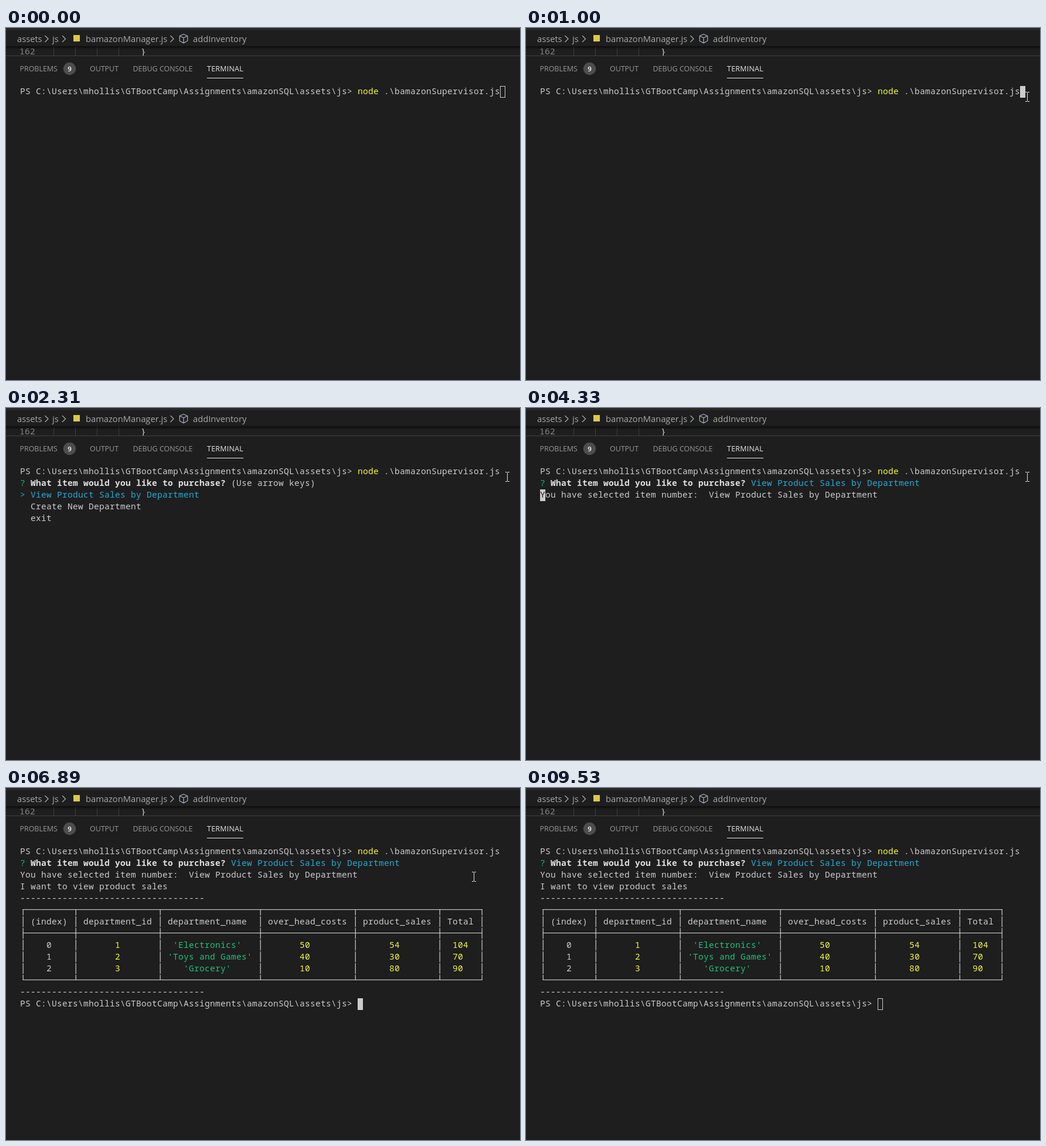
An HTML page that plays this animation: 877 px wide and 601 px high, repeating every 9620 ms.

```html
<!DOCTYPE html>
<html lang="en">
<head>
<meta charset="utf-8">
<title>Terminal session</title>
<style>
  html, body { margin: 0; width: 100%; height: 100%; overflow: hidden; background: #1e1e1e; }
  svg { display: block; }
  text { white-space: pre; }
  .mono { font: 14.5px "Noto Sans Mono", "DejaVu Sans Mono", monospace; letter-spacing: .3px; }
  .bold { font-weight: 700; }
  .crumb { font: 14.7px "Open Sans", "Noto Sans", sans-serif; fill: #a9a9a9; }
  .tab { font: 12.45px "Open Sans", "Noto Sans", sans-serif; fill: #979797; }
</style>
</head>
<body>
<svg id="stage" width="877" height="601" viewBox="0 0 877 601">
  <defs>
    <linearGradient id="shade" x2="0" y2="1">
      <stop offset="0" stop-color="#000" stop-opacity=".6"/>
      <stop offset="1" stop-color="#000" stop-opacity="0"/>
    </linearGradient>
  </defs>
  <rect width="877" height="601" fill="#1e1e1e"/>
  <rect width="877" height="4" fill="#272728"/>

  <path d="M81.5 31v16M118.5 31v16M155.5 31v16M192.5 31v16" stroke="#404040"/>
  <text class="mono" x="23" y="45" fill="#858585">162</text>
  <text class="mono" x="230" y="45" fill="#d4d4d4">}</text>
  <rect y="31" width="877" height="6" fill="url(#shade)"/>
  <rect y="47" width="877" height="1" fill="#414141"/>

  <text class="crumb" x="19" y="24">assets</text>
  <text class="crumb" x="79" y="24">js</text>
  <text class="crumb" x="136" y="24">bamazonManager.js</text>
  <text class="crumb" x="319" y="24">addInventory</text>
  <path d="M66.5 13l5.5 5.5-5.5 5.5M96 13l5.500 5.500-5.500 5.500M280.500 13l5.500 5.500-5.500 5.500"
        fill="none" stroke="#a9a9a9" stroke-width="1.3"/>
  <rect x="115" y="12" width="11" height="11" fill="#dcc84a"/>
  <path d="M303 10.500l6.700 3v8.500l-6.700 3.700-6.700-3.700v-8.500zM296.300 13.500l6.700 3.200 6.700-3.200M303 16.700v9"
        fill="none" stroke="#a8b4d0" stroke-width="1.2" stroke-linejoin="round"/>

  <text class="tab" x="23.500" y="74">PROBLEMS</text>
  <circle cx="108.500" cy="69.500" r="10.700" fill="#4d4d4d"/>
  <text class="tab" x="108.500" y="74" text-anchor="middle" style="fill:#fff;font-size:11.500px;font-weight:600">9</text>
  <text class="tab" x="143" y="74">OUTPUT</text>
  <text class="tab" x="216.500" y="74">DEBUG CONSOLE</text>
  <text class="tab" x="343" y="74" style="fill:#e7e7e7;letter-spacing:.25px">TERMINAL</text>
  <rect x="343" y="85" width="62" height="1" fill="#e7e7e7"/>
</svg>
<script>
const LOOP = 9620, CELL = 9, ROW = 20, LEFT = 24, TOP = 99;
const FG = '#cccccc', YELLOW = '#f5f543', GREEN = '#1fc27c', CYAN = '#23acd3', BG = '#1e1e1e';
const stage = document.getElementById('stage');

function add(parent, tag, attrs, text) {
  const el = document.createElementNS('http://www.w3.org/2000/svg', tag);
  for (const key in attrs) el.setAttribute(key, attrs[key]);
  if (text) el.textContent = text;
  return parent.appendChild(el);
}
const colX = col => LEFT + col * CELL;
const rowY = row => TOP + row * ROW;

function write(parent, col, row, text, fill = FG, bold = false) {
  add(parent, 'text', { x: colX(col), y: rowY(row) + 14, fill, class: bold ? 'mono bold' : 'mono' }, text);
}

// Parts of the picture that are only visible from one time to another
const timed = [];
function scene(from, to) {
  const el = add(stage, 'g', {});
  timed.push({ el, from, to });
  return el;
}

const PROMPT = 'PS C:\\Users\\mhollis\\GTBootCamp\\Assignments\\amazonSQL\\assets\\js>';
write(stage, 0, 0, PROMPT);
write(stage, 64, 0, 'node', YELLOW);
write(stage, 69, 0, '.\\bamazonSupervisor.js');

function question(parent) {
  write(parent, 0, 1, '?', '#0dbc79');
  write(parent, 2, 1, 'What item would you like to purchase?', '#e0e0e0', true);
}

const menu = scene(2310, 4330);
question(menu);
write(menu, 40, 1, '(Use arrow keys)');
write(menu, 0, 2, '>', CYAN);
write(menu, 2, 2, 'View Product Sales by Department', CYAN);
write(menu, 2, 3, 'Create New Department');
write(menu, 2, 4, 'exit');

const answer = scene(4330, LOOP);
question(answer);
write(answer, 40, 1, 'View Product Sales by Department', CYAN);
write(answer, 0, 2, 'You have selected item number:  View Product Sales by Department');

const report = scene(4410, LOOP);
write(report, 0, 3, 'I want to view product sales');
write(report, 0, 4, '-'.repeat(35));
write(report, 0, 12, '-'.repeat(35));
write(report, 0, 13, PROMPT);

const edges = [0, 10, 26, 45, 63, 79, 87];
const rules = [5, 7, 11];
for (const row of rules)
  add(report, 'rect', { x: colX(0) + 4.6, y: rowY(row) + 8, width: 87 * CELL + 1.2, height: 1.1, fill: FG });
for (let row = 5; row <= 11; row++) {
  const y = rowY(row) + (row === 5 ? 8 : 0);
  const end = rowY(row) + (row === 11 ? 9 : 18.5);
  for (const col of edges)
    add(report, 'rect', { x: colX(col) + 4.6, y, width: 1.2, height: end - y, fill: FG });
}

const heads = ['(index)', 'department_id', 'department_name', 'over_head_costs', 'product_sales', 'Total'];
heads.forEach((head, i) => write(report, edges[i] + 2, 6, head));
const sales = [
  ['1', "'Electronics'", '50', '54', '104'],
  ['2', "'Toys and Games'", '40', '30', '70'],
  ['3', "'Grocery'", '10', '80', '90']
];
sales.forEach((cells, n) => [String(n), ...cells].forEach((cell, i) => {
  const room = edges[i + 1] - edges[i] - 1;
  const col = edges[i] + 1 + Math.floor((room - cell.length) / 2);
  write(report, col, 8 + n, cell, i === 0 ? FG : i === 2 ? GREEN : YELLOW);
}));

function caret(from, to, col, row, filled, letter) {
  const g = scene(from, to);
  const x = colX(col), y = rowY(row);
  if (filled) add(g, 'rect', { x, y, width: CELL, height: ROW, fill: FG });
  else add(g, 'rect', { x: x + .5, y: y + .5, width: CELL - 1, height: ROW - 1, fill: 'none', stroke: FG });
  if (letter) write(g, col, row, letter, BG);
}
caret(0, 1000, 91, 0, false);
caret(1000, 1760, 91, 0, true);
caret(1760, 2310, 0, 1, true);
caret(4330, 4410, 0, 2, true, 'Y');
caret(4410, 9530, 64, 13, true);
caret(9530, LOOP, 64, 13, false);

const pointer = add(stage, 'path', {
  d: 'M-3.5 -8h3M.5 -8h3M0 -7.500v15M-3.500 8h3M.5 8h3', fill: 'none', stroke: '#e6e6e6'
});

// Pointer centre at a time, or null while it is away
function pointerAt(t) {
  if (t < 70 || t >= 6960) return null;
  if (t >= 6890) return [798.5, 151.5];
  if (t >= 1000) return [855.5, 117.5];
  if (t >= 920) return [861.5, 119.5];
  const p = Math.min(9, Math.floor((t - 70) / 75.5)) / 9;
  const rise = 1 - (1 - p) ** 2;
  const x = 812.5 + 32 * p + 27 * Math.sin(Math.PI * p);
  return [Math.round(Math.min(x, 855.5) - .5) + .5, Math.round(557 - 440 * rise) + .5];
}

function draw(t) {
  for (const { el, from, to } of timed)
    el.style.display = t >= from && t < to ? '' : 'none';
  const at = pointerAt(t);
  pointer.style.display = at ? '' : 'none';
  if (at) pointer.setAttribute('transform', `translate(${at[0]} ${at[1]})`);
}

const start = performance.now();
function tick() {
  draw((performance.now() - start) % LOOP);
  requestAnimationFrame(tick);
}
tick();
</script>
</body>
</html>
```
